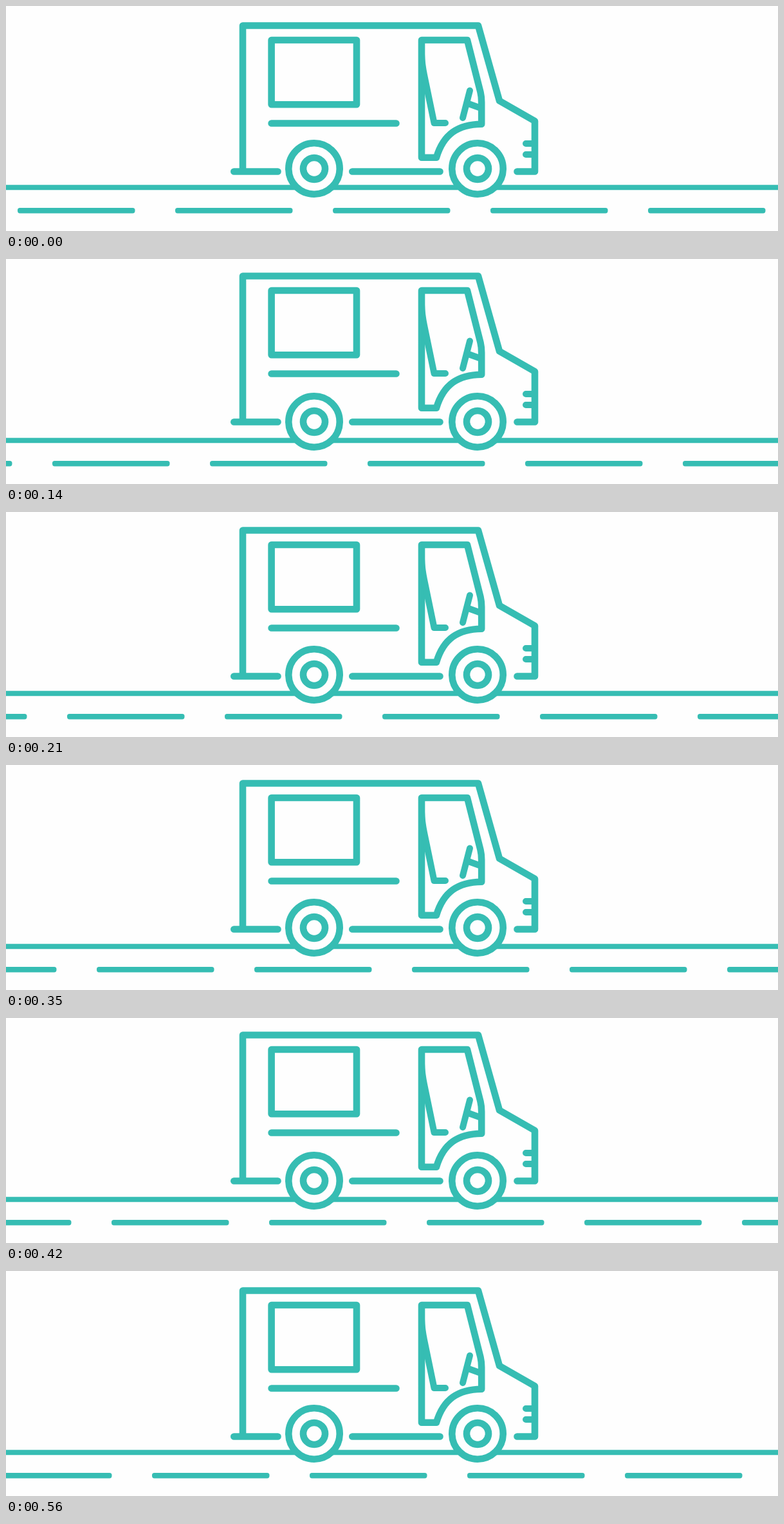
An HTML page for the animation above (630 ms loop, 1200 by 350 pixels).

```html
<!DOCTYPE html>
<html lang="en">
<head>
<meta charset="utf-8">
<title>Van on the road</title>
<style>
  html, body { margin: 0; width: 100%; height: 100%; overflow: hidden; background: #fefefe; }
  svg { display: block; width: 100%; height: 100%; }
  .line { fill: none; stroke: #36bdb3; stroke-width: 10.6; stroke-linecap: round; stroke-linejoin: round; }
  .tyre { fill: #fefefe; }
</style>
</head>
<body>
<svg viewBox="0 0 1200 350">
  <path class="line" d="M-10 282.2H1210" style="stroke-width:8"/>
  <g id="dashes" fill="#36bdb3"></g>
  <g id="van" class="line">
    <path d="M368 256V30.5H734L767 147.5L822 179V257.5H794.5"/>
    <path d="M354.3 257.5H422.5M538.3 257.5H674.5"/>
    <path d="M412.6 53H545V153.2H412.6ZM412.6 182.5H606.5"/>
    <path d="M646 53H717L737.5 134Q739.2 141 739.2 150V183.7C703 184 680 199 669 235.7H646Z"/>
    <path d="M683 182H665.5L650 107Q646.5 90 646 75" style="stroke-width:10"/>
    <path d="M721 131.5L710 174M719 152L737 158.5" style="stroke-width:10"/>
    <path d="M808 214H822M808 231H822" style="stroke-width:10"/>
  </g>
  <g id="wheels" class="line"></g>
</svg>
<script>
  const STEP = 70, GAP = 245;
  const roadX = [18, 48, 72, 95, 118, 141, 164, 193, 227];
  const lift = [0, 2, 4, 2, 0, 2, 4, 2, 0];

  const byId = id => document.getElementById(id);
  const add = (parent, tag, attrs) => {
    const el = document.createElementNS("http://www.w3.org/2000/svg", tag);
    for (const key in attrs) el.setAttribute(key, attrs[key]);
    parent.append(el);
  };

  for (let i = -1; i < 5; i++) {
    add(byId("dashes"), "rect", { x: i * GAP, y: 314, width: 182.5, height: 8.4, rx: 3.6 });
  }
  for (const cx of [479, 733]) {
    add(byId("wheels"), "circle", { cx, cy: 253, r: 39.7, class: "tyre" });
    add(byId("wheels"), "circle", { cx, cy: 253, r: 17 });
  }

  function draw(now) {
    const i = Math.floor(now / STEP) % roadX.length;
    byId("dashes").setAttribute("transform", `translate(${roadX[i]} 0)`);
    byId("van").setAttribute("transform", `translate(0 ${-lift[i]})`);
  }

  const start = performance.now();
  function tick() {
    draw(performance.now() - start);
    requestAnimationFrame(tick);
  }
  tick();
</script>
</body>
</html>
```
